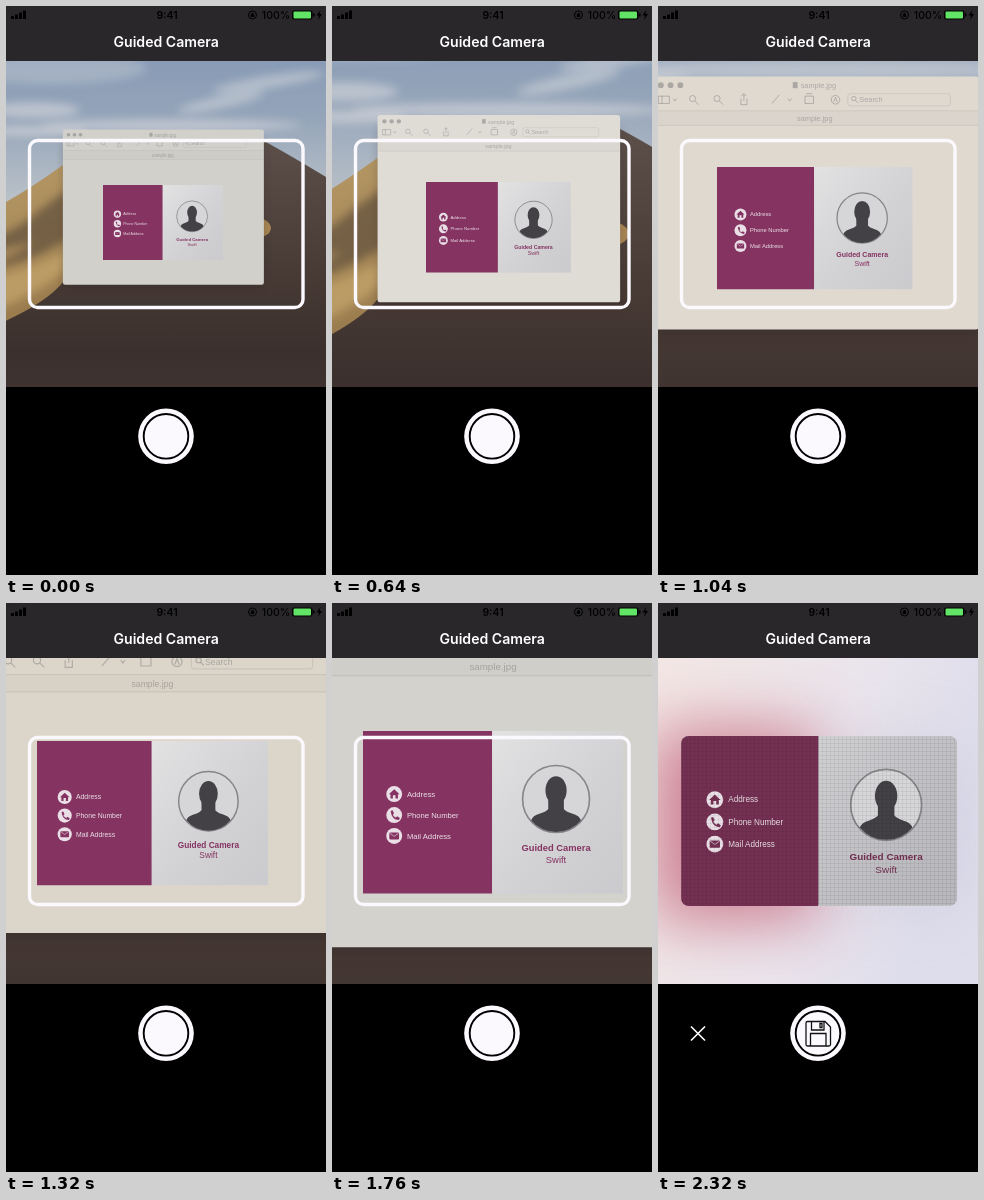
Recreate the animation shown at these times as an HTML page. Size 320 by 569 pixels, loop 2.36 s.

```html
<!DOCTYPE html>
<html lang="en">
<head>
<meta charset="utf-8">
<title>Guided Camera</title>
<style>
  html, body { margin: 0; width: 100%; height: 100%; overflow: hidden; background: #000; }
  svg { display: block; width: 100%; height: 100%; }
  .ui { font-family: Inter, "Liberation Sans", sans-serif; font-weight: 600; text-anchor: middle; }
  .print { font-family: "Liberation Sans", Arial, sans-serif; }
  .mid { text-anchor: middle; }
  #scene { --wine: #853462; --paper: #dad9da; filter: blur(.5px); }
  #shot { --wine: #743052; --paper: #c3c2c5; }
  .wine { fill: var(--wine); }
  .paper { fill: var(--paper); }
</style>
</head>
<body>
<svg viewBox="0 0 320 569" preserveAspectRatio="none">
  <defs>
    <linearGradient id="sky" x2="0" y2="1">
      <stop stop-color="#8599b5"/><stop offset=".45" stop-color="#94a4b9"/><stop offset="1" stop-color="#bcc3c9"/>
    </linearGradient>
    <linearGradient id="shade" x2="0" y2="1">
      <stop stop-color="#5d504b"/><stop offset=".45" stop-color="#463934"/><stop offset=".65" stop-color="#3b302d"/><stop offset="1" stop-color="#453834"/>
    </linearGradient>
    <linearGradient id="gold" x2=".4" y2="1">
      <stop stop-color="#bfa26f"/><stop offset=".6" stop-color="#a88a59"/><stop offset="1" stop-color="#927448"/>
    </linearGradient>
    <linearGradient id="sheen" x2="1" y2="1">
      <stop stop-color="#fff" stop-opacity=".25"/><stop offset="1" stop-color="#778" stop-opacity=".15"/>
    </linearGradient>
    <linearGradient id="haze" x2="1" y2=".3">
      <stop stop-color="#f3e7e5"/><stop offset=".6" stop-color="#eae5ec"/><stop offset="1" stop-color="#deddec"/>
    </linearGradient>
    <filter id="soft" x="-60%" y="-100%" width="220%" height="300%"><feGaussianBlur stdDeviation="4"/></filter>
    <filter id="glow" x="-100%" y="-100%" width="300%" height="300%"><feGaussianBlur stdDeviation="32"/></filter>
    <pattern id="mesh" width="4" height="4" patternUnits="userSpaceOnUse">
      <path d="M0 .5H4M.5 0V4" stroke="#000" stroke-opacity=".06"/>
    </pattern>
    <clipPath id="view"><path d="M0 55H320V381H0z"/></clipPath>
    <clipPath id="cut"><rect x="23" y="133" width="276" height="170" rx="8"/></clipPath>

    <!-- Business card, 160 x 100 -->
    <g id="card" class="print">
      <path class="paper" d="M0 0H160V100H0z"/>
      <path fill="url(#sheen)" d="M79 0H160V100H79z"/>
      <path class="wine" d="M0 0H79.4V100H0z"/>
      <g fill="#eadfe7">
        <circle cx="19.2" cy="38.8" r="4.9"/><circle cx="19.2" cy="51.7" r="4.9"/><circle cx="19.2" cy="64.6" r="4.9"/>
        <g font-size="4.75"><text x="27" y="40.4">Address</text><text x="27" y="53.3">Phone Number</text><text x="27" y="66.3">Mail Address</text></g>
      </g>
      <g class="wine">
        <path d="M15.9 38.9L19.2 35.8l3.3 3.1h-1v2.6h-1.5v-2h-1.6v2h-1.5v-2.6z"/>
        <path d="M17 49.2l1.2-.4 .9 1.9-.8 .8q.7 1.4 1.9 1.8l.8-.8 1.7 1.1-.6 1.2q-4.5-.2-5.1-5.6z"/>
        <rect x="16.2" y="62.5" width="6" height="4.2" rx=".5"/>
      </g>
      <path d="M16.4 62.8l2.8 2 2.8-2" fill="none" stroke="#eadfe7" stroke-width=".4"/>
      <circle cx="118.8" cy="41.8" r="20.6" fill="#d6d5d7" stroke="#858487" stroke-width="1"/>
      <g fill="#434145">
        <ellipse cx="118.8" cy="36.6" rx="6.5" ry="8.8"/>
        <path d="M114 40h9.600v8q1.200 1.600 5 2.800 4.800 1.400 5.500 4.200A20 20 0 0 1 103.500 55q.7-2.800 5.500-4.200 3.800-1.200 5-2.800z"/>
      </g>
      <g class="wine mid"><text x="118.8" y="74" font-size="5.76" font-weight="700">Guided Camera</text><text x="118.8" y="81.2" font-size="5.8">Swift</text></g>
    </g>
  </defs>

  <rect width="320" height="569"/>
  <g clip-path="url(#view)">
    <g id="scene">
      <path fill="#cdcecd" d="M0 55H320V381H0z"/>
      <g id="cam">
        <g transform="scale(1.3333) translate(-97 -179)">
          <path fill="url(#sky)" d="M-80 35H420V200H-80z"/>
          <g fill="#dcdde0" filter="url(#soft)">
            <ellipse cx="45" cy="62" rx="95" ry="16" opacity=".3"/>
            <ellipse cx="28" cy="104" rx="46" ry="8" opacity=".55"/>
            <ellipse cx="20" cy="125" rx="60" ry="5" opacity=".6"/>
            <ellipse cx="262" cy="76" rx="56" ry="6" opacity=".5" transform="rotate(-9 262 76)"/>
            <ellipse cx="215" cy="96" rx="44" ry="6" opacity=".5" transform="rotate(-12 215 96)"/>
            <ellipse cx="165" cy="119" rx="130" ry="6" opacity=".55"/>
          </g>
          <path fill="url(#shade)" d="M-80 245L150 145Q215 123 258 135 282 148 320 171L420 226V460H-80z"/>
          <path fill="url(#gold)" d="M-80 230Q-20 210 0 196 25 182 57 159L140 130 100 240 57 276Q30 310-80 345z"/>
          <g filter="url(#soft)">
            <path fill="#65523f" opacity=".75" d="M-80 256Q0 232 24 212 43 196 62 184V232Q30 254-10 262L-80 276Q0 260 28 236 16 238-80 262z"/>
            <path fill="#c8a76d" opacity=".7" d="M-80 285Q0 276 62 244V262Q20 300-80 325z"/>
          </g>
          <path fill="#a98655" d="M250 211q15 3 15 12-2 8-15 9z"/>
          <path fill="#281f1c" opacity=".3" filter="url(#soft)" d="M58 135H257V281H58z"/>
        </g>
        <rect id="win" x="-53.5" y="-74" width="268" height="207" rx="3"/>
        <path d="M-53.5-46H214.5V-34H-53.5z" fill="#888" opacity=".06"/>
        <path d="M-53.5-46H214.5M-53.5-34H214.5" stroke="#777" stroke-opacity=".22" stroke-width=".6"/>
        <g fill="#777" opacity=".5">
          <circle cx="-46" cy="-67" r="2.4"/><circle cx="-38" cy="-67" r="2.4"/><circle cx="-30" cy="-67" r="2.4"/>
          <g class="print mid" font-size="6"><text x="83" y="-64.5">sample.jpg</text><text x="80" y="-37.4">sample.jpg</text><text x="126" y="-53">Search</text></g>
          <path d="M62-69.500h4v5h-4z"/>
        </g>
        <g fill="none" stroke="#666" stroke-opacity=".38" stroke-width=".8">
          <path d="M-48-58h9v6h-9zM-45-58v6M-36-56l1.5 2 1.5-2M22-60v6M20-58l2-2 2 2M19.5-56v5h5v-5M45-52l6-7M58-56l1.5 2 1.5-2M72-58h7v6h-7zM73-60h5"/>
          <circle cx="-20" cy="-56" r="2.5"/><path d="M-18-54l3 3"/>
          <circle cx="0" cy="-56" r="2.5"/><path d="M2-54l3 3"/>
          <circle cx="97" cy="-55" r="3.5"/><path d="M95.5-53l1.5-4 1.5 4"/>
          <circle cx="112" cy="-56" r="1.8"/><path d="M113.5-54.5l2 2"/>
          <rect x="107" y="-60" width="84" height="10" rx="2" stroke-opacity=".15"/>
        </g>
        <use href="#card"/>
      </g>
    </g>
    <rect id="guide" x="23.5" y="134.5" width="273.5" height="167" rx="8" fill="none" stroke="#fbf9fe" stroke-width="3.4"/>
    <g id="shot">
      <path fill="url(#haze)" d="M0 55H320V381H0z"/>
      <path fill="#bf566f" opacity=".72" filter="url(#glow)" d="M-4 126H160V318H-4z"/>
      <path fill="#b9b9cb" opacity=".4" filter="url(#glow)" d="M180 140H300V300H180z"/>
      <g clip-path="url(#cut)">
        <path class="wine" d="M20 130H160V305H20z"/><path class="paper" d="M160 130H300V305H160z"/>
        <use href="#card" transform="translate(23.8 130) scale(1.72)"/>
        <path fill="url(#mesh)" d="M20 130H300V305H20z"/>
      </g>
    </g>
  </g>

  <path fill="#29272a" d="M0 0H320V55H0z"/>
  <g class="ui">
    <text x="160.2" y="41" font-size="14.1" fill="#fff">Guided Camera</text>
    <text x="161" y="13" font-size="10.5">9:41</text>
    <text x="270" y="13" font-size="10.5" font-weight="500">100%</text>
  </g>
  <path d="M5 10h3v3H5zM9 8.500h3v4.500H9zM13 6.500h3v6.500H13zM17 4.500h3v8.500H17zM314.500 4l-4 5.500h2.500l-1 4.500 4-6h-2.500z"/>
  <circle cx="246.500" cy="9" r="4" fill="none" stroke="#000"/><path d="M244.800 8.500h3.400v2.500h-3.400zM245.500 7h2v2h-2z"/>
  <rect x="286" y="4.500" width="20.500" height="9" rx="2"/><path d="M307 7.500h1.500v3H307z"/>
  <rect x="287.500" y="5.500" width="17.500" height="7" rx="1" fill="#62e466"/>

  <circle cx="160" cy="430.300" r="27.800" fill="#fbf9fe"/>
  <circle cx="160" cy="430.300" r="22.300" fill="none" stroke="#000" stroke-width="1.900"/>
  <g id="actions" fill="none">
    <path d="M33 423.500l14 14M47 423.500l-14 14" stroke="#fff" stroke-width="1.600"/>
    <path d="M149.500 418.500H167L172.500 424V441.500q0 1.500-1.500 1.500H149.500q-1.500 0-1.500-1.500V420q0-1.500 1.500-1.500zM153.500 418.500v8.500h12.500v-8.500M162 420.500h2v4h-2zM152.500 443v-12.500h15.500V443" stroke="#111" stroke-width="1.300"/>
  </g>
</svg>
<script>
const LOOP = 2360, STEP = 40, SNAP = 2000;
// time, card x, card y, scale, window r, g, b
const path = [
  [0, 97, 179, .75, 209, 208, 203],
  [280, 101, 180, .795, 213, 212, 206],
  [640, 94, 176, .905, 223, 220, 214],
  [1040, 59, 161, 1.222, 223, 217, 208],
  [1320, 31, 138, 1.443, 220, 213, 202],
  [1760, 31, 128, 1.625, 212, 210, 205],
  [2000, 25, 130, 1.71, 209, 208, 205]
];
const el = id => document.getElementById(id);
const show = (id, on) => { el(id).style.display = on ? "" : "none"; };

const slope = (i, c) => (path[i + 1][c] - path[i][c]) / (path[i + 1][0] - path[i][0]);

// Smooth tangent that never overshoots a key.
function tangent(i, c) {
  if (i === 0) return slope(0, c);
  if (i === path.length - 1) return slope(i - 1, c);
  const a = slope(i - 1, c), b = slope(i, c);
  return a * b > 0 ? 2 * a * b / (a + b) : 0;
}

function sample(t, c) {
  let i = 0;
  while (i < path.length - 2 && t >= path[i + 1][0]) i++;
  const a = path[i], b = path[i + 1], d = b[0] - a[0];
  const u = (t - a[0]) / d, v = 1 - u;
  return v * v * (1 + 2 * u) * a[c] + u * u * (3 - 2 * u) * b[c]
    + d * u * v * (v * tangent(i, c) - u * tangent(i + 1, c));
}

function draw(t) {
  const taken = t >= SNAP;
  show("scene", !taken);
  show("guide", !taken);
  show("shot", taken);
  show("actions", taken);
  if (taken) return;
  const [x, y, s, r, g, b] = [1, 2, 3, 4, 5, 6].map(c => sample(t, c));
  el("cam").setAttribute("transform", `translate(${x} ${y}) scale(${s})`);
  el("win").setAttribute("fill", `rgb(${r},${g},${b})`);
}

const start = performance.now();
function tick() {
  const t = (performance.now() - start) % LOOP;
  draw(Math.floor(t / STEP) * STEP);
  requestAnimationFrame(tick);
}
tick();
</script>
</body>
</html>
```
